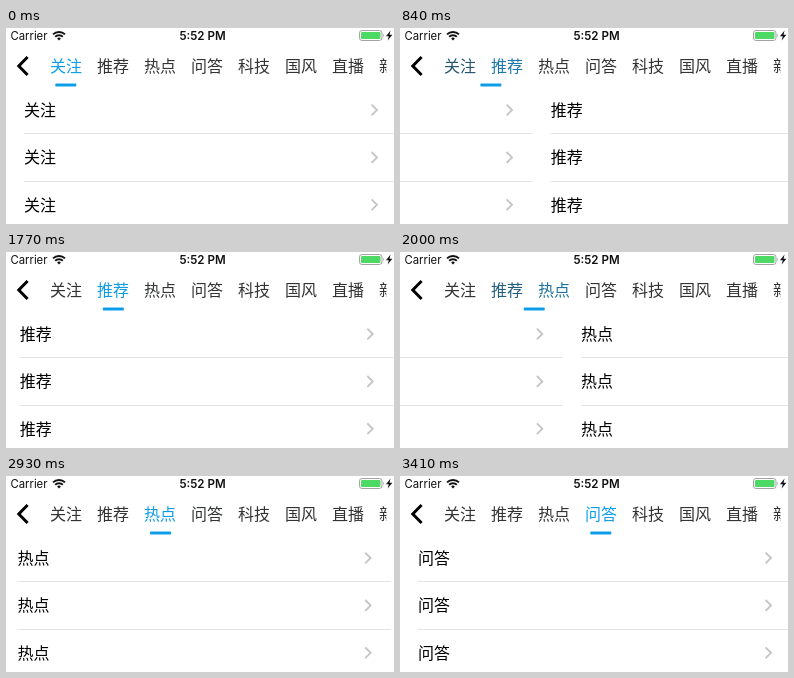
Animation, 388 px wide and 196 px high, one loop 4.3 s. Source, as an HTML page:

```html
<!DOCTYPE html>
<html lang="zh-CN">
<head>
<meta charset="utf-8">
<title>Swipe tabs</title>
<style>
  html, body { margin: 0; width: 100%; height: 100%; overflow: hidden; background: #fff; }
  svg { display: block; }
  .zh { font: 400 16px "Noto Sans CJK SC", "Noto Sans CJK", sans-serif; }
  .status { font-family: Inter, Roboto, sans-serif; fill: #111; }
</style>
</head>
<body>
<svg width="388" height="196" viewBox="0 0 388 196">
  <defs><clipPath id="tabClip"><rect x="30" y="22" width="350.5" height="40"/></clipPath></defs>

  <g class="status">
    <text x="4.5" y="12" font-size="11.3">Carrier</text>
    <text x="196.5" y="12" font-size="11.6" font-weight="600" text-anchor="middle">5:52 PM</text>
  </g>
  <g fill="none" stroke="#111" stroke-width="2">
    <path d="M47 6.4A8.6 8.6 0 0 1 59 6.4M49.2 8.8A5.4 5.4 0 0 1 56.8 8.8"/>
    <path d="M53 12.4L51.1 10.5A2.7 2.7 0 0 1 54.9 10.5Z" fill="#111" stroke="none"/>
  </g>
  <rect x="353.5" y="2.5" width="22.5" height="10" rx="2.6" fill="none" stroke="#a2a2a2"/>
  <rect x="355" y="4" width="19.5" height="7" rx="1.3" fill="#4cd964"/>
  <path d="M377 5.6Q378.6 7.5 377 9.4Z" fill="#a2a2a2"/>
  <path d="M384.6 2.5L380 8.2H382.8L381.6 12.5L386.4 6.7H383.5Z" fill="#111"/>

  <path d="M21.6 29L12.8 38L21.6 47" fill="none" stroke="#000" stroke-width="3"/>
  <g id="tabs" class="zh" clip-path="url(#tabClip)"></g>
  <rect id="bar" y="55.6" width="21" height="3" rx="0.8" fill="#0e9de9"/>
  <g id="pages" class="zh"></g>
</svg>
<script>
const NS = 'http://www.w3.org/2000/svg';
const LOOP = 4300, PAGE = 391.7, TAB = 47, ROW = 47.4;
const names = ['关注', '推荐', '热点', '问答', '科技', '国风', '直播', '新闻'];
const idle = [51, 51, 51], active = [14, 157, 233];
// start, end, sharpness of the deceleration
const swipes = [[570, 1110, 3.73], [1740, 2300, 3.58], [2900, 3410, 4.45]];

const $ = id => document.getElementById(id);

function add(parent, tag, attrs, text) {
  const el = document.createElementNS(NS, tag);
  for (const k in attrs) el.setAttribute(k, attrs[k]);
  if (text) el.textContent = text;
  return parent.appendChild(el);
}

const tabs = names.map((name, i) =>
  add($('tabs'), 'text', { x: 44 + TAB * i, y: 44 }, name));

names.slice(0, 4).forEach((name, i) => {
  const page = add($('pages'), 'g', { transform: `translate(${PAGE * i} 0)` });
  for (let r = 0; r < 3; r++) {
    const y = 82 + ROW * r;
    add(page, 'text', { x: 18, y: y + 6 }, name);
    add(page, 'path', {
      d: `M365.6 ${y - 5.4}l5.4 5.4l-5.4 5.4`,
      fill: 'none', stroke: '#c5c5c9', 'stroke-width': 1.9
    });
    if (r < 2) add(page, 'rect', {
      x: 18, y: 105 + 48 * r, width: PAGE - 18, height: 1, fill: '#e5e5e7'
    });
  }
});

function progress(t, [start, end, power]) {
  const u = Math.min(1, Math.max(0, (t - start) / (end - start)));
  return 1 - Math.pow(1 - u * u, power);
}

function mix(k) {
  return `rgb(${idle.map((c, i) => Math.round(c + (active[i] - c) * k))})`;
}

function draw(t) {
  const pos = swipes.reduce((sum, s) => sum + progress(t, s), 0);
  $('pages').setAttribute('transform', `translate(${-pos * PAGE} 0)`);
  $('bar').setAttribute('x', 49.3 + pos * TAB);
  tabs.forEach((tab, i) =>
    tab.setAttribute('fill', mix(Math.max(0, 1 - Math.abs(pos - i)))));
}

const origin = performance.now();
function tick() {
  draw((performance.now() - origin) % LOOP);
  requestAnimationFrame(tick);
}
tick();
</script>
</body>
</html>
```
